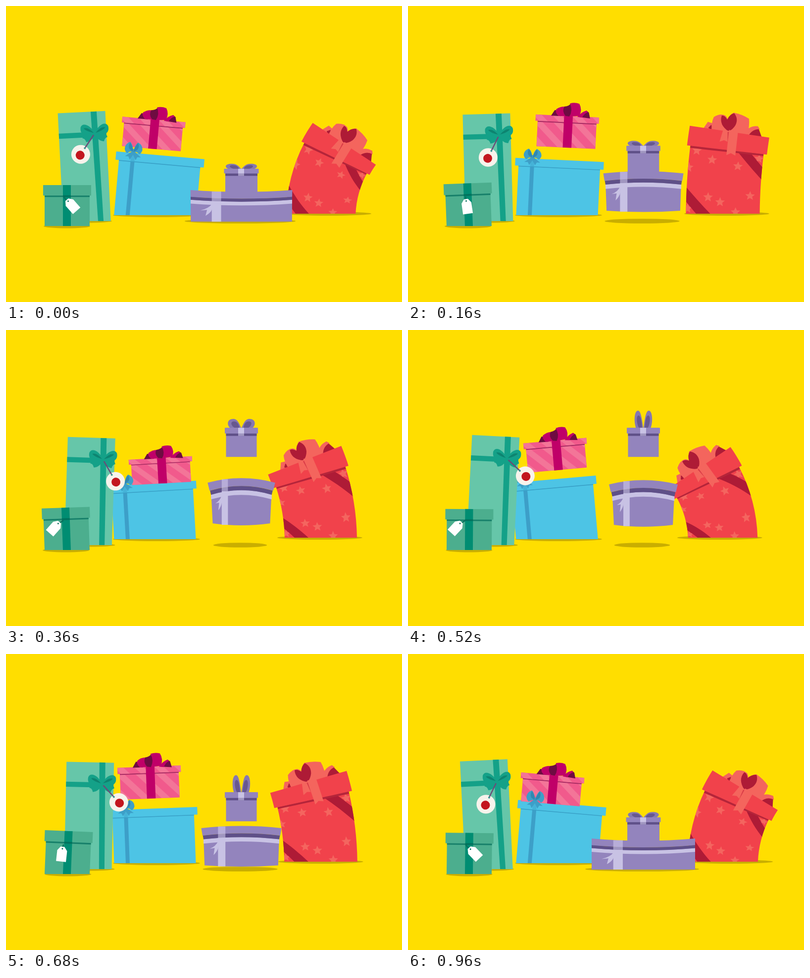
An HTML page with a canvas for the animation above (1000 ms loop, 800 by 600 pixels).

```html
<!DOCTYPE html>
<html lang="en">
<head>
<meta charset="utf-8">
<title>Dancing presents</title>
<style>
  html, body { margin: 0; width: 100%; height: 100%; overflow: hidden; background: #ffde00; }
  canvas { display: block; }
</style>
</head>
<body>
<canvas id="stage" width="800" height="600"></canvas>
<script>
const ctx = document.getElementById('stage').getContext('2d');
const LOOP = 1000, STEP = 40;
const rad = deg => deg * Math.PI / 180;

// Cosine swing that peaks at the given time, n times per loop.
const swing = (t, peak = 0, n = 1) => Math.cos(2 * Math.PI * n * (t - peak) / LOOP);
// Hump from 0 to 1 and back around a middle time.
const hump = (t, mid, half, power) => Math.max(0, 1 - Math.abs((t - mid) / half) ** power);

// Drawing helpers
function fill(color, path) {
  ctx.fillStyle = color;
  ctx.fill(new Path2D(path));
}
function rect(color, x, y, w, h) {
  ctx.fillStyle = color;
  ctx.fillRect(x, y, w, h);
}
function oval(color, x, y, rx, ry = rx) {
  ctx.fillStyle = color;
  ctx.beginPath();
  ctx.ellipse(x, y, rx, ry, 0, 0, 7);
  ctx.fill();
}
function line(color, width, x0, y0, x1, y1) {
  ctx.strokeStyle = color;
  ctx.lineWidth = width;
  ctx.beginPath();
  ctx.moveTo(x0, y0);
  ctx.lineTo(x1, y1);
  ctx.stroke();
}
function at(x, y, deg, sy, draw, floor) {
  ctx.save();
  if (floor) {
    ctx.beginPath();
    ctx.rect(0, 0, 800, floor);
    ctx.clip();
  }
  ctx.translate(x, y);
  ctx.rotate(rad(deg));
  ctx.scale(1, sy);
  draw();
  ctx.restore();
}
function mirror(draw) {
  draw();
  ctx.save();
  ctx.scale(-1, 1);
  draw();
  ctx.restore();
}
const shadow = (x, y, rx, ry = 4) => oval('#c9ae00', x, y, rx, ry);

// Red box: everything is bent along an arc
const STARS = [[-59, .73], [-27, .64], [25, .59], [-30, .195], [-6, .14], [53, .227],
  [-72, .53], [-70, .06], [25, .02], [65, .71]];

function redLoops() {
  const light = '#f4655d', dark = '#ae1b36';
  fill(light, 'M-55-8L-47-20L-37-17L-36 6Z');
  fill(dark, 'M-46-8L-40-14L-34 4Z');
  fill(dark, 'M24-4L54-12L62 10L38 10Z');
  fill(light, 'M22 6Q36-14 54-12L58-6Q42-7 34 10Z');
  fill(light, 'M-4 6L-39 2Q-41-18-35-30Q-22-38-12-33Q-2-24-4 6Z');
  fill(light, 'M-4 6Q-12-30 5-39Q22-36 36-27Q38-12 32 8Z');
  fill(dark, 'M-5-1Q-25-14-19-33Q-13-34-8-25Q-3-36 6-38Q15-27 9-14Q4-5-5-1Z');
}
function redTails() {
  const light = '#f4655d';
  fill(light, 'M-16-4L-3-2L-7 20L-14 17L-23 20Z');
  fill('#d93c48', 'M-7 0L-3 0L-7 20Z');
  fill(light, 'M-4-4L14 0L9 48L0 43L-9 47Z');
}

function drawRed(t) {
  const deg = 31 * swing(t) + 3.3 * swing(t, 0, 2) + 3 * swing(t, 0, 3) - 3.7;
  const a = rad(deg) + 1e-6, len = 168 - 52 * a * a, wide = 1.025 - .18 * a * a;
  shadow(641 + deg * .33, 421, 86);

  const warp = (u, v) => {
    const p = a * v;
    return [636 + len * (1 - Math.cos(p)) / a + 8 * p + u * wide * Math.cos(p),
      421 - len * Math.sin(p) / a + u * wide * Math.sin(p)];
  };
  const shape = pts => {
    ctx.beginPath();
    pts.forEach(([u, v], i) => {
      const [u2, v2] = pts[(i + 1) % pts.length];
      for (let k = 0; k < 1; k += .125) ctx.lineTo(...warp(u + (u2 - u) * k, v + (v2 - v) * k));
    });
    ctx.closePath();
  };
  const poly = (color, ...pts) => {
    shape(pts);
    ctx.fillStyle = color;
    ctx.fill();
  };
  const box = (color, half, v0, v1) => poly(color, [-half, v0], [half, v0], [half, v1], [-half, v1]);
  const [x, y] = warp(3, 1);

  box('#f1424b', 73, 0, .78);
  ctx.save();
  shape([[-73, 0], [73, 0], [73, .78], [-73, .78]]);
  ctx.clip();
  for (const [u, v] of STARS) {
    const pts = [];
    for (let i = 0; i < 10; i++) {
      const r = i % 2 ? 4.5 : 10, q = i * Math.PI / 5;
      pts.push([u + r * Math.sin(q), v + r * Math.cos(q) / 165]);
    }
    poly('#f4655f', ...pts);
  }
  poly('#ae1b36', [20, .78], [46, .78], [76, .59], [76, .43]);
  poly('#ae1b36', [-75, .31], [-25, 0], [-53, 0], [-75, .15]);
  box('#b5253a', 73, .752, .78);
  ctx.restore();
  at(x, y, deg - 8, 1, redLoops);
  box('#f1424b', 79.5, .776, 1);
  at(x, y, deg - 8, 1, redTails);
}

// Pink box hops twice per loop and squashes on landing
function drawPink(t, deg) {
  const AIR = 280, phase = (t + 56) % 500;
  const k = Math.min(1, phase / AIR), q = Math.max(0, (phase - AIR) / (500 - AIR));
  const y = 311 - 136 * k * (1 - k);
  const sy = (58 + 8 * k - 8 * q - 10 * Math.sin(Math.PI * q)) / 65.5;
  const x = 301 + 19 * swing(t, 290) + 5 * swing(t, 170, 2);

  at(x, y, deg, sy, () => {
    const striped = (x, y, w, h) => {
      rect('#f15a8c', x, y, w, h);
      ctx.save();
      ctx.beginPath();
      ctx.rect(x, y, w, h);
      ctx.clip();
      for (let s = -110; s < 70; s += 40) fill('#f37598', `M${s} ${y}h18l${h} ${h}h-18Z`);
      ctx.restore();
    };
    striped(-59.5, -53, 119, 53);
    rect('#a52a62', -59.5, -53, 119, 2.5);
    striped(-64, -65.5, 128, 13);
    rect('#c00068', -6.5, -65.5, 17.5, 65.5);
    ctx.translate(2, -65.5);
    ctx.scale(1, 1 / Math.sqrt(sy));
    const main = '#c00068', dark = '#6e0c41';
    fill(dark, 'M-35 1L-28-11L-18-9L-14 1Z');
    fill(dark, 'M22 1L36-13L41-9L44 3Z');
    fill(main, 'M18 1Q26-10 36-13L39-10Q31-6 28 2Z');
    fill(main, 'M-25-13Q-14-21-4-18L2 0L-20 1Q-28-6-25-13Z');
    fill(dark, 'M-9-19Q0-20 4-26L8-8L2 1L-6 0Q-14-10-9-19Z');
    fill(main, 'M2-26Q12-29 21-26Q28-14 22-1L2 1Q9-12 2-26Z');
  });
}

function drawBlue(t) {
  const deg = 5.1 * swing(t), sy = 1 + .06 * swing(t, 0, 2);
  shadow(304, 424, 88);
  at(301, 424, deg, sy, () => {
    rect('#4dc4e5', -82.5, -100, 165, 116);
    rect('#3d9fc8', -59, -100, 8, 116);
    rect('#389fc6', -82.5, -99.5, 165, 2);
    rect('#4dc4e5', -89.5, -115, 179, 16);
    rect('#45b2d7', -59, -115, 8, 16);
  }, 424);
  drawPink(t, deg);
  at(301, 424, deg, sy, () => {
    ctx.translate(-55, -118.5);
    rect('#3d9fc8', -3, -4, 6, 9);
    mirror(() => {
      fill('#3d9fc8', 'M1-2L-16 11L-9 11L-6 17L2 4Z');
      fill('#3d9fc8', 'M0 3Q-1-11-8-17Q-18-13-18-3Q-16 4-12 5Q-6-1 0 3Z');
      fill('#3187b0', 'M0 2Q-2-9-8-16Q-12-9-8-3Z');
    });
  });
}

// Tall green box with a round tag
function drawTall(t) {
  const wave = swing(t), deg = -2.9 * wave;
  const tag = 11 + 43 * swing(t, 560) - 6.5 * swing(t, 560, 2);
  shadow(166 - 4 * wave, 436, 52, 3.5);
  at(165 - 1.3 * wave, 436, deg, .98 + .025 * wave * wave, () => {
    const ribbon = '#14a188';
    rect('#66c6a9', -48, -220, 96, 230);
    rect(ribbon, -48, -179, 96, 10.5);
    fill(ribbon, 'M18.5-220h12L33.5 12h-11Z');
    ctx.translate(24.5, -176);
    mirror(() => {
      fill(ribbon, 'M0 0C-8-18-24-24-28-13C-31 5-13 5 0 0Z');
      fill(ribbon, 'M0-1C-9 0-26 0-25 9Q-20 9-18 17C-8 16-2 9 0-1Z');
      fill('#0d8470', 'M-2-1Q-13-14-22-11Q-17-5-2-1Z');
    });
    ctx.rotate(rad(-tag - deg));
    oval('#f7f3ec', 0, 51, 19);
    line('#6b4b78', 2.5, 0, 4, 0, 37);
    oval('#3f9a94', 0, 36, 2);
    oval('#c3161f', 0, 53, 9);
  }, 436);
}

// Small green box with a white label
function drawSmall(t) {
  const deg = -2.6 * swing(t, 250), h = 85.5 - 2.5 * swing(t, 0, 2);
  const tag = 2 + 46 * swing(t, 445), x = 115.5 - .18 * tag, y = 391 - .04 * tag;
  shadow(123 + deg, 446.5, 47);
  at(123.5, 446, deg, h / 84, () => {
    rect('#4cae8e', -45.5, -64, 91, 74);
    rect('#008d72', -8.5, -64, 16, 74);
    rect('#17806a', -45.5, -63, 91, 3.5);
    rect('#4cae8e', -48.5, -84, 97, 21.5);
    rect('#008d72', -8.5, -84, 16, 21.5);
    rect('#00735d', -8.5, -63, 16, 3.5);
  }, 446);
  line('#0a6f5c', 2.5, 116, 386, x, y + 2);
  at(x, y, tag, 1, () => {
    fill('#fff', 'M-4 0H4L10 8V30H-10V8Z');
    oval('#0a6f5c', 0, 4, 1.5);
  });
}

// Purple pair: the wide one jumps and throws the little one up
const LILAC = '#9384bd', PALE = '#c8c2e4', DEEP = '#5f5088', VEIL = 'rgba(214,208,238,.55)';

function drawLittle(t, seat) {
  const flight = 245 + .0016 * (t - 440) ** 2;
  const squash = Math.max(0, swing(t)), h = 57 - 10 * squash;
  const w = 33.5 + 1.5 * squash, body = w - 2.5, lid = h * .2;
  const ears = ((1 + swing(t, 600)) / 2) ** 2;
  ctx.save();
  ctx.translate(475.5, Math.min(seat, flight) - h);
  ctx.save();
  ctx.scale(32 - 16 * ears, 10 + 28 * ears);
  mirror(() => {
    fill('#8678b1', 'M0 .05C-.15-.4-.25-1-.6-1C-1.05-1-1.1-.3-.8.05Z');
    fill('#67588f', 'M-.15 0C-.2-.4-.3-.72-.55-.72C-.85-.7-.75-.2-.5 0Z');
  });
  ctx.restore();
  rect(LILAC, -body, 0, body * 2, h + 2);
  rect(DEEP, -body, lid, body * 2, 5);
  rect(LILAC, -w, 0, w * 2, lid);
  rect(PALE, -6.5, 0, 12, lid);
  rect(VEIL, -6.5, lid, 12, 5);
  ctx.restore();
}

function drawPurple(t) {
  const s = hump(t, 420, 430, 2);
  const cx = 475.5, w = 104.5 - 37 * s, body = w - 7 * s, bend = 4.5 - 14 * s;
  const base = 437 - 45 * hump(t, 400, 300, 3), y = base - 63 - 20 * s;
  const dark = y + 13.5 + 2.5 * s, light = dark + 6 + 2.5 * s, under = light + 7.5 + 2 * s;
  const band = (color, y0, y1, w0, w1, b0 = bend, b1 = bend) => fill(color,
    `M${cx - w0} ${y0}Q${cx} ${y0 + 2 * b0} ${cx + w0} ${y0}L${cx + w1} ${y1}Q${cx} ${y1 + 2 * b1} ${cx - w1} ${y1}Z`);

  shadow(473, 436, 115 - 62 * s, 4.8);
  drawLittle(t, y + bend);
  band(LILAC, dark, base, body, w - 10.5 * s, bend, 4 * s);
  band(PALE, light, under, body, body);
  band(LILAC, y, dark, w, body + 3 * s);
  band(DEEP, dark, light, body + 2 * s, body);

  const rw = w * .092, x = cx - w * .49 - rw, dip = bend * .76;
  rect(VEIL, x, y + dip, rw * 2, light - y);
  rect(PALE, x, light + dip, rw * 2, base + 3 * s - light - dip);

  ctx.save();
  ctx.translate(x + .5, under + dip - 2);
  ctx.scale(w * .3 - 7, (base - under) * .6 + 2);
  fill(PALE, 'M0 0Q-.3.4-1 .55L-.42.5L-.55 1Q-.1.75 0 .45Z');
  ctx.restore();
}

function frame(now) {
  const t = Math.floor(now % LOOP / STEP) * STEP;
  rect('#ffde00', 0, 0, 800, 600);
  drawRed(t);
  drawBlue(t);
  drawTall(t);
  drawSmall(t);
  drawPurple(t);
  requestAnimationFrame(frame);
}
requestAnimationFrame(frame);
</script>
</body>
</html>
```
